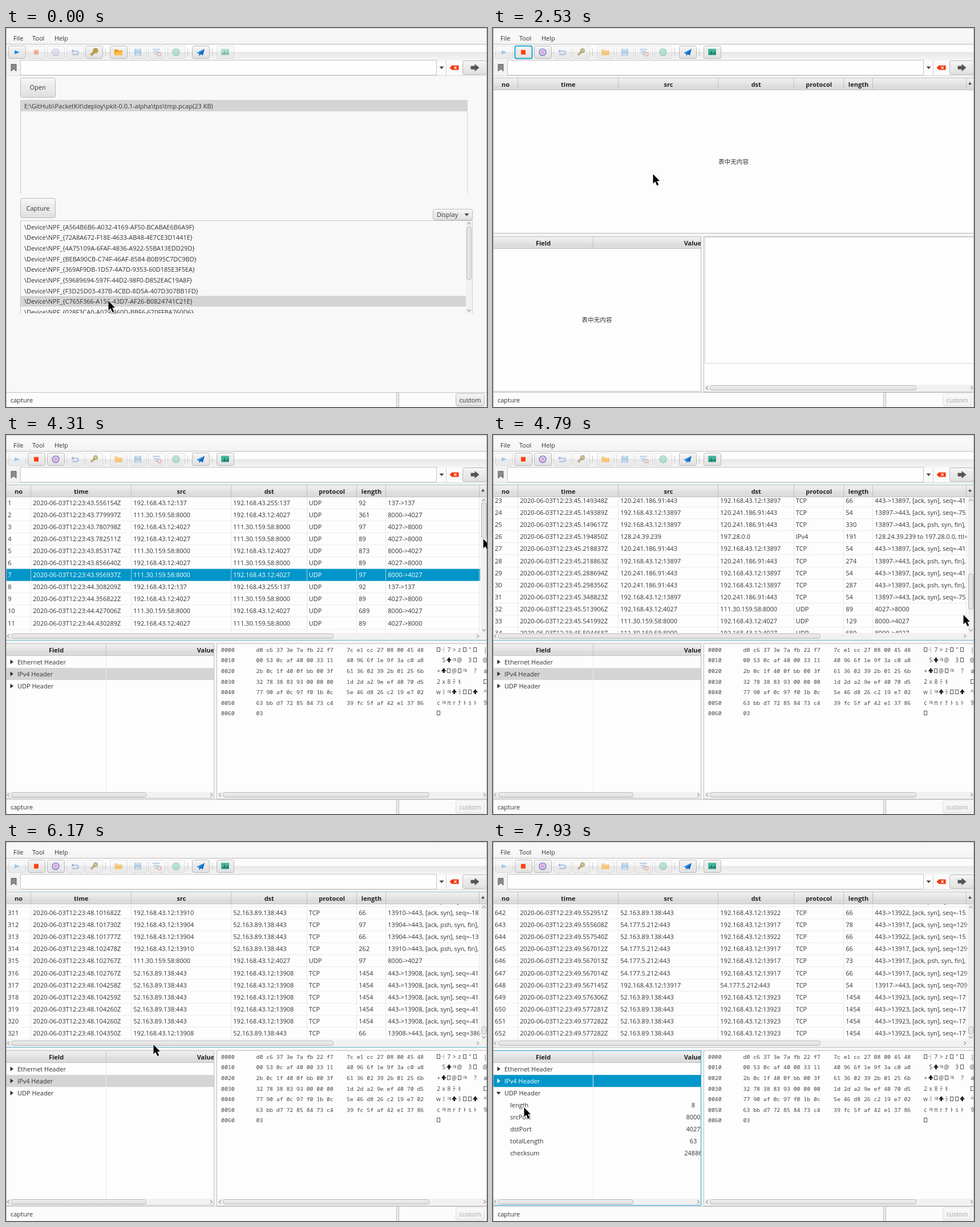
These frames come from a looping animation (843x664 px, 8 s). An HTML page with a canvas:

```html
<!DOCTYPE html>
<html lang="en">
<head>
<meta charset="utf-8">
<title>Packet capture</title>
<style>
html, body { margin: 0; width: 100%; height: 100%; overflow: hidden; background: #f8f8f8; }
canvas { display: block; }
</style>
</head>
<body>
<canvas id="stage" width="843" height="664"></canvas>
<script>
const LOOP = 8000, BEAT = 120, ROW = 21.1;
const BLUE = '#0096c9', INK = '#333', EDGE = '#b9b9b9', GRAY = '#d4d4d4', FOCUS = '#1fa6d2';
const LIST_FOCUS = 1290, CAPTURE = 1660, ROWS_IN = 2770, PICK = 3140, EXPAND = 7570;
const SANS = '"Open Sans", "Noto Sans", sans-serif';
const g = document.getElementById('stage').getContext('2d');

// The picture moves in beats; each run of beats begins at one of these times.
const RUNS = [0, 280, 420, 1290, 1660, 2030, 2290, 3140, 3530, 4040, 4310, 4930,
  5450, 5600, 5870, 6020, 6170, 6310, 6820, 7090, 7930, LOOP];
// Pointer: time, x, y
const POINTER = [
  [270, 179, 478], [280, 175, 478], [660, 139, 478], [1900, 139, 478], [2150, 161, 404], [2530, 280, 256],
  [2890, 317, 243], [3380, 317, 241], [3890, 785, 122], [4310, 836, 182], [4790, 824, 315], [5170, 824, 369],
  [5450, 815, 334], [5720, 700, 322], [6170, 258, 355], [6670, 80, 385], [7090, 41, 430],
  [7330, 12, 436], [7690, 12, 438], [7930, 54, 465]
];
const COUNT = [[2650, 0], [2770, 9], [2890, 12], [4310, 39], [4790, 39],
  [5290, 110], [6170, 321], [7090, 556], [7810, 652]];
const DRAG = [[4310, 0], [4790, 467.7]];

function beatAt(t) {
  const i = RUNS.findLastIndex(r => r <= t), from = RUNS[i];
  const room = Math.floor((RUNS[i + 1] - from) / BEAT) - 1;
  return from + BEAT * Math.max(0, Math.min(room, Math.floor((t - from) / BEAT)));
}
function lerpKeys(keys, t, col = 1) {
  if (t <= keys[0][0]) return keys[0][col];
  const i = keys.findIndex(k => k[0] >= t);
  if (i < 0) return keys.at(-1)[col];
  const a = keys[i - 1], b = keys[i];
  return a[col] + (b[col] - a[col]) * (t - a[0]) / (b[0] - a[0]);
}

// Peers: remote address and the usual local port
const PEERS = {
  q: ['111.30.159.58:8000', 4027], b: ['192.168.43.255:137', 137], t: ['120.241.186.91:443', 13897],
  m: ['52.163.89.138:443'], a: ['54.177.5.212:443'], d: ['192.168.43.1:53', 65130]
};
const packets = [];
// Each line: microseconds, direction with peer and port ending, length, then TCP sequence or p for push.
function traffic(first, second, lines) {
  lines.split('\n').forEach((line, i) => {
    const [micros, route, ...rest] = line.trim().split(' ');
    packets[first + i] = [second + micros / 1e6, route, ...rest];
  });
}
traffic(1, 43, `556154 >b 92
  779997 <q 361
  780798 >q 97
  782511 >q 89
  853174 <q 873
  856640 >q 89
  956937 <q 97`);
traffic(8, 44, `308209 >b 92
  356822 >q 89
  427006 <q 689
  430289 >q 89`);
traffic(23, 45, `149348 <t 66 -41
  149389 >t 54 -75
  149617 >t 330 p
  194850 raw 191
  218837 <t 54 -41
  218863 >t 274 p
  288694 <t 54 -41
  298356 <t 287 p
  348823 >t 54 -75
  513906 >q 89
  541992 <q 129
  594468 <q 689`);
traffic(311, 48, `101682 >m10 66 -18
  101730 >m04 97 p
  101777 >m04 66 -13
  102478 >m10 262 p
  102767 <q 97
  102767 <m08 1454 -41
  104258 <m08 1454 -41
  104259 <m08 1454 -41
  104260 <m08 1454 -41
  104260 <m08 1454 -41
  104350 >m08 66 386`);
traffic(546, 49, `058936 <m19 1454 171
  058936 <m19 1454 171
  058937 <m19 1454 171
  058937 <m19 159 p
  059045 >m19 66 -16
  059288 >m18 159 p
  060904 >m19 159 p
  061117 <a17 74 129
  061217 >a17 66 709
  061444 >d 79
  061550 >a17 583 p`);
traffic(642, 49, `552951 <m22 66 -15
  555608 <a17 78 129
  557540 <m22 66 -15
  567012 <a17 66 129
  567013 <a17 73 p
  567014 <a17 66 129
  567145 >a17 54 709
  576306 <m23 1454 -17
  577281 <m23 1454 -17
  577282 <m23 1454 -17
  577282 <m23 1454 -17`);

// Fill the gaps with similar traffic at evenly spread times.
let last = 1;
for (let n = 2; n < packets.length; n++) {
  if (!packets[n]) continue;
  const from = packets[last][0], step = (packets[n][0] - from) / (n - last);
  for (let k = last + 1; k < n; k++) {
    const port = String(k / 28 | 0).padStart(2, '0'), pick = k * 7919 % 11;
    const body = k < 20 ? (k % 2 ? '>q 89' : '<q 129')
      : pick < 6 ? `<m${port} 1454 -41` : pick < 8 ? `>m${port} 66 -18`
      : pick < 10 ? `>m${port} 262 p` : '<q 97';
    packets[k] = [from + step * (k - last), ...body.split(' ')];
  }
  last = n;
}

function cells(n) {
  const [sec, route, size, tail] = packets[n];
  const time = `2020-06-03T12:23:${sec.toFixed(6)}Z`;
  if (route === 'raw') {
    const src = '128.24.39.239', dst = '197.28.0.0';
    return [n, time, src, dst, 'IPv4', size, `${src} to ${dst}, ttl=`];
  }
  const [remote, usual] = PEERS[route[1]];
  const ends = ['192.168.43.12:' + (usual || '139' + route.slice(2)), remote];
  if (route[0] === '<') ends.reverse();
  const ports = ends.map(e => e.split(':')[1]).join('->');
  const flags = !tail ? '' : tail === 'p' ? ', [ack, psh, syn, fin], ' : ', [ack, syn], seq=' + tail;
  return [n, time, ...ends, tail ? 'TCP' : 'UDP', size, ports + flags];
}

// Drawing helpers
function rect(x, y, w, h, fill) { g.fillStyle = fill; g.fillRect(x, y, w, h); }
function frame(x, y, w, h, color) {
  g.strokeStyle = color; g.lineWidth = 1; g.strokeRect(x + .5, y + .5, w - 1, h - 1);
}
function text(s, x, cy, color = INK, align = 'left', font = '11px ' + SANS) {
  g.font = font; g.fillStyle = color; g.textAlign = align;
  g.fillText(s, x, cy + 4);
}
const bold = (s, x, cy) => text(s, x, cy, '#222', 'center', 'bold 11px ' + SANS);
const han = (s, x, cy) => text(s, x, cy, INK, 'center', '10.6px "Noto Sans CJK SC", "Noto Sans CJK", sans-serif');
function clip(x, y, w, h, draw) {
  g.save(); g.beginPath(); g.rect(x, y, w, h); g.clip(); draw(); g.restore();
}
function faded(off, draw) { g.save(); if (off) g.globalAlpha = .4; draw(); g.restore(); }
function shade(y, h, ...stops) {
  const fill = g.createLinearGradient(0, y, 0, y + h);
  stops.forEach((c, i) => fill.addColorStop(i / (stops.length - 1), c));
  return fill;
}
function shape(d, x, y, color, width) {
  g.save(); g.translate(x, y);
  const path = new Path2D(d);
  if (width) { g.strokeStyle = color; g.lineWidth = width; g.stroke(path); }
  else { g.fillStyle = color; g.fill(path); }
  g.restore();
}
function ring(x, y, r, color, width) {
  g.beginPath(); g.arc(x, y, r, 0, 2 * Math.PI);
  g.strokeStyle = color; g.lineWidth = width; g.stroke();
}
function pill(x, y, w, h, fill, stroke, width = 1) {
  g.beginPath(); g.roundRect(x + .5, y + .5, w - 1, h - 1, 3);
  g.fillStyle = fill; g.fill();
  g.strokeStyle = stroke; g.lineWidth = width; g.stroke();
}
function button(x, y, w, h, focus) {
  pill(x, y, w, h, shade(y, h, '#fbfbfb', '#ececec', '#e8e8e8', '#dedede'), focus ? FOCUS : EDGE, focus ? 2 : 1);
}
function header(x, y, w, h) {
  rect(x, y, w, h, shade(y, h, '#f1f1f1', '#e9e9e9', '#dddddd', '#dadada'));
  rect(x, y, w, 1, '#c6c6c6'); rect(x, y + h - 1, w, 1, '#c2c2c2');
}
function chevron(x, y, turn) {
  g.save(); g.translate(x, y); g.rotate(turn * Math.PI / 2);
  shape('M-2-3L2 0L-2 3', 0, 0, '#777', 1);
  g.restore();
}
function hbar(x, end, y, from, to) {
  rect(x, y, end - x, 11, '#f1f1f1');
  chevron(x + 4, y + 5.5, 2); chevron(end - 4, y + 5.5, 0);
  pill(from, y + 1, to - from, 9, shade(y, 10, '#f6f6f6', '#dadada'), EDGE);
}
function vbar(x, y, end, from, to) {
  rect(x, y, 11, end - y, '#f1f1f1');
  chevron(x + 5.5, y + 5, 3); chevron(x + 5.5, end - 5, 1);
  pill(x + 1, from, 9, to - from, '#e4e4e4', EDGE);
}
const dropArrow = (x, y) => shape('M-4-2h8L0 2.5z', x, y, '#444');

function drawTools(t) {
  const live = t >= CAPTURE, y = 42.5;
  const tool = (x, on, icon) => faded(!on, () => {
    button(x, 31, 31, 23, x === 38 && live && t < PICK);
    icon(x + 15);
  });
  tool(4, !live, x => shape('M-4-3.5L5 0L-4 3.5z', x, y, '#178be8'));
  tool(38, live, x => rect(x - 4, y - 4, 8, 8, '#ff4010'));
  tool(72, live, x => {
    ring(x, y, 5.8, '#7c74d4', 1.6); ring(x, y, 3, '#b07fdc', 1); ring(x, y, 1, '#e0559a', 1);
  });
  tool(106, false, x => {
    shape('M-5-2H3a3 3 0 0 1 0 6H-5', x, y, '#3f7fd6', 2);
    shape('M-7-2l4-3.5v7z', x, y, '#3f7fd6');
  });
  tool(139, !live, x => {
    for (const [color, w] of [['#444', 3.8], ['#f5bd14', 2.2]]) {
      shape('M-5 5L1-1', x, y, color, w);
      ring(x + 3, y - 3, 2.6, color, w - .4);
    }
  });
  tool(182, !live, x => {
    shape('M-7-5h5l2 2h7v8h-14z', x, y, '#f39a12');
    shape('M-4-1h12l-2 6h-13z', x, y, '#ffc04a');
  });
  tool(216, false, x => {
    rect(x - 6, y - 6, 12, 12, '#4793d0');
    rect(x - 3, y - 6, 6, 4, '#f4f8fc'); rect(x - 4, y + 1, 8, 5, '#f4f8fc');
  });
  tool(249, false, x => {
    shape('M-7-5H6M-5-1H4M-3 3H1', x, y, '#4d90d0', 2);
    ring(x + 5, y + 3.5, 3, '#e25545', 1.4);
  });
  tool(283, false, x => { ring(x, y, 3, '#65c99b', 6); ring(x, y, 6.3, '#3da679', 1.2); });
  tool(326, true, x => {
    shape('M7-6L-7 1l4 1.5z', x, y, '#1e90ec');
    shape('M7-6L-3 2.5l1 4l2-3l4 2z', x, y, '#1769c0');
  });
  tool(369, live, x => {
    rect(x - 7, y - 6, 14, 11, '#42b69c');
    shape('M-4 4v-3M-1 4v-6M2 4v-3M5 4v-5', x, y, '#14584c', 1.6);
  });
}

function drawChrome(t) {
  rect(0, 0, 843, 664, t < CAPTURE ? '#f8f8f8' : '#f4f4f4');
  rect(0, 0, 843, 28, shade(0, 28, '#f7f7f7', '#f8f8f8', '#f3f3f3'));
  text('File', 13, 18); text('Tool', 46, 18); text('Help', 85, 18);
  rect(0, 28, 843, 1, '#bdbdbd');
  rect(0, 29, 843, 13, '#fdfdfd');
  rect(0, 42, 843, 14, shade(42, 14, '#e8e8e8', '#f4f4f4'));
  for (const x of [174, 318, 361]) rect(x, 36, 1, 13, '#c8c8c8');
  drawTools(t);

  rect(0, 56, 843, 27, '#f2f2f2');
  rect(26, 57, 728, 25, '#fefefe');
  frame(25, 56, 730, 27, '#c4c4c4');
  const bookmark = 'M-4.5-6h9v12l-4.5-3.5l-4.5 3.5z';
  shape(bookmark, 13.5, 69.5, '#8a8a8a');
  shape(bookmark, 13.5, 69.5, '#666', 1);
  rect(755, 57, 45, 25, '#fbfbfb');
  rect(771, 57, 1, 25, '#cfcfcf');
  dropArrow(763.5, 69.5);
  shape('M-8 0l4-4h12v8h-12z', 785.5, 69.5, '#f5390c');
  shape('M0-2l4 4M4-2l-4 4', 785.5, 69.5, '#fff', 1.3);
  button(800, 57, 43, 25);
  shape('M-7-3h7v-3.5l8 6.5l-8 6.5v-3.5h-7z', 821.5, 69.5, '#555');
  rect(0, 83, 843, 1, '#dcdcdc');
}

function drawStatus(live) {
  rect(0, 638, 843, 26, '#fbfbfb');
  rect(0, 638, 843, 1, '#c2c2c2');
  rect(684, 639, 5, 25, '#ececec');
  rect(684, 639, 1, 25, '#bbb'); rect(688, 639, 1, 25, '#bbb');
  text('capture', 8, 651.5);
  faded(live, () => { button(788, 640, 51, 23); text('custom', 813.5, 651.5, INK, 'center'); });
}

const DEVICES = `A564B6B6-A032-4169-AF50-BCABAE6B6A9F
72A8A672-F18E-4633-AB48-4E7CE3D1441E
4A75109A-6FAF-4836-A922-55BA13EDD29D
BEBA90CB-C74F-46AF-8584-B0B95C7DC9BD
369AF9DB-1D57-4A7D-9353-60D185E3F5EA
59689694-597F-44D2-98F0-D852EAC19A8F
F3D25D03-437B-4CBD-8D5A-407D307BB1FD
C765F366-A156-43D7-AF26-B0824741C21E
028F3CA0-A079-460D-BBF6-670FFBA760D6`.split('\n');

function drawWelcome(focus) {
  button(25, 87, 62, 35); text('Open', 55.5, 104, INK, 'center');
  rect(25, 126, 784, 20, GRAY);
  rect(25, 126, 1, 164, '#c8c8c8'); rect(808, 126, 1, 164, GRAY);
  text('E:\\GitHub\\PacketKit\\deploy\\pkit-0.0.1-alpha\\tps\\tmp.pcap(23 KB)', 32, 136.5);
  button(25, 298, 62, 35); text('Capture', 56, 315.5, INK, 'center');
  button(748, 317, 70, 20); text('Display', 755, 327);
  dropArrow(807.5, 327);
  clip(25, 337, 793, 163, () => {
    DEVICES.forEach((id, i) => {
      const on = i === 7;
      if (on) rect(25, 469.5, 781, 18.5, focus ? BLUE : GRAY);
      text(`\\Device\\NPF_{${id}}`, 32, 348.5 + i * 18.7, on && focus ? '#fff' : INK);
    });
    vbar(806, 337, 500, 348, 441);
  });
  rect(25, 337, 793, 1, '#c8c8c8'); rect(25, 337, 1, 163, '#c8c8c8'); rect(817, 337, 1, 163, '#d0d0d0');
  if (focus) frame(24, 336, 795, 165, FOCUS);
}

const COLUMNS = [['no', 0, 44], ['time', 44, 219.5], ['src', 220, 395], ['dst', 395, 527.5],
  ['protocol', 527.5, 615], ['length', 615, 666], ['', 666, 830]];

function drawTable(t) {
  const total = Math.floor(lerpKeys(COUNT, t));
  rect(1, 87, 841, 272, '#fdfdfd');
  header(0, 87, 843, 22);
  for (const [name, from, to] of COLUMNS) {
    bold(name, (from + to) / 2, 98.5);
    rect(Math.round(to) - 1, 88, 1, 20, '#c0c0c0');
  }
  bold('+', 836, 97);
  if (!total) { han('表中无内容', 421.5, 233.5); return; }

  const end = (total - 1) * ROW - 216.5;
  const scroll = t > 4790 ? end : lerpKeys(DRAG, t);
  const scrollable = total > 11, right = scrollable ? 831 : 842;
  clip(1, 109, right - 1, 238, () => {
    const first = Math.max(1, Math.floor(scroll / ROW));
    for (let n = first; n <= Math.min(total, first + 14); n++) {
      const y = 118.5 + (n - 1) * ROW - scroll, on = n === 7 && t >= PICK;
      if (on) rect(0, y - 10.5, 843, ROW, BLUE);
      else rect(0, Math.round(y + 10), 843, 1, '#ececec');
      cells(n).forEach((cell, i) => text(cell, COLUMNS[i][1] + 3.3, y, on ? '#fff' : INK));
    }
    for (const c of COLUMNS) rect(Math.round(c[2]) - 1, 109, 1, 238, 'rgba(225,225,225,.75)');
  });
  if (scrollable) {
    const size = Math.max(14, 219 * 237 / (total * ROW)), top = 118 + (219 - size) * scroll / end;
    vbar(832, 109, 347, top, top + size);
  }
  hbar(0, 831, 347, 9, 574);
  rect(831, 347, 11, 11, '#f1f1f1');
}

const UDP = { length: 8, srcPort: 8000, dstPort: 4027, totalLength: 63, checksum: 24886 };

function drawTree(t) {
  const open = t >= EXPAND;
  rect(0, 365, 365, 272, '#fdfdfd');
  clip(0, 365, 364, 272, () => {
    header(0, 365, 365, 22);
    rect(175, 366, 1, 20, '#c0c0c0');
    bold('Field', 88, 376.5); bold('Value', 350, 376.5);
    if (t < ROWS_IN) { han('表中无内容', 182, 511); return; }
    if (t >= PICK) {
      ['Ethernet Header', 'IPv4 Header', 'UDP Header'].forEach((name, i) => {
        const y = 397.5 + i * ROW, on = i === 1, ink = on && open ? '#fff' : INK;
        if (on) rect(1, y - 10.5, 363, ROW, open ? BLUE : GRAY);
        shape(i === 2 && open ? 'M-4-2h7.5L-.2 3z' : 'M-2.5-4L3 0L-2.5 4z', 10, y, ink);
        text(name, 20, y, ink);
      });
      if (open) Object.entries(UDP).forEach(([name, value], i) => {
        const y = 460.8 + i * ROW;
        text(name, 30, y); text(value, 351, y, INK, 'center');
      });
    }
    rect(175, 387, 1, 238, '#ececec');
    hbar(0, 364, 625, 9, 246);
  });
  frame(0, 365, 365, 272, open ? FOCUS : '#c0c0c0');
}

const HEX_LEFT = `d0 c6 37 3e 7a fb 22 f7
00 53 0c af 40 00 33 11
2b 0c 1f 40 0f bb 00 3f
32 78 38 83 93 00 00 00
77 90 af 0c 97 f0 1b 0c
63 bb d7 72 85 84 73 c4
03`.split('\n');
const HEX_RIGHT = `7c e1 cc 27 08 00 45 48
40 96 6f 1e 9f 3a c0 a8
61 36 02 39 2b 01 25 6b
1d 2d a2 9e ef 40 70 d5
5e 46 d8 26 c2 19 e7 02
39 fc 5f af 42 e1 37 86
`.split('\n');
const HEX_CHARS = ['□┤7>z□"□|', ' S♠ㅋ@ 3□@', '+♠□@□ㅋ ?a', '2x8ﾃﾓ   □', 'wﾐㅋ♠ﾗ□□♠^', 'cㅋπrﾅﾄsﾄ9', '□'];

function drawHex(t) {
  const mono = '9.8px "Noto Sans Mono", "DejaVu Sans Mono", monospace';
  const glyphs = '10px "Open Sans", "Noto Sans CJK SC", "Noto Sans CJK", "DejaVu Sans", sans-serif';
  rect(370, 365, 473, 272, '#fdfdfd');
  frame(369, 365, 475, 273, '#c0c0c0');
  if (t < ROWS_IN) frame(371, 366, 480, 222, '#d6d6d6');
  if (t >= PICK) HEX_CHARS.forEach((chars, i) => {
    const y = 375.7 + i * 18.6, put = (s, x) => text(s, x, y, '#444', 'left', mono);
    put(`00${i}0`, 377); put(HEX_LEFT[i], 438.5); put(HEX_RIGHT[i], 597);
    [...chars].forEach((c, k) => {
      const x = k === 8 ? 840 : 758 + k * 9.2;
      if (c === '□') frame(Math.round(x) - 3, Math.round(y) - 4, 6, 8, '#555');
      else if (c === '♠') shape('M0-5L4.5 1H1.5V4h-3V1h-3z', x, y, '#222');
      else text(c, x, y, '#444', 'center', glyphs);
    });
  });
  hbar(371, 843, 625, 380, 742);
}

function drawPointer(x, y) {
  const arrow = 'M0 0V16.5L3.8 13L6.8 20L9.8 18.7L6.8 12H11.5z';
  shape(arrow, x + .5, y, '#fff', 1.6);
  shape(arrow, x + .5, y, '#000');
}

function draw(t) {
  const live = t >= CAPTURE, tableFocus = t >= PICK && t < EXPAND;
  drawChrome(t);
  if (live) {
    drawTable(t);
    rect(0, 359, 843, 1, tableFocus ? '#58adc4' : '#b8b8b8');
    if (tableFocus) rect(0, 87, 843, 1, '#9cc6d2');
    drawTree(t);
    drawHex(t);
  } else drawWelcome(t >= LIST_FOCUS);
  drawStatus(live);
  rect(0, 0, 1, 664, '#b4b4b4'); rect(842, 0, 1, 664, '#b4b4b4'); rect(0, 0, 843, 1, '#c8c8c8');
  drawPointer(Math.round(lerpKeys(POINTER, t)), Math.round(lerpKeys(POINTER, t, 2)));
}

const start = performance.now();
let shown = -1;
function tick() {
  const beat = beatAt((performance.now() - start) % LOOP);
  if (beat !== shown) draw(shown = beat);
  requestAnimationFrame(tick);
}
tick();
</script>
</body>
</html>
```
